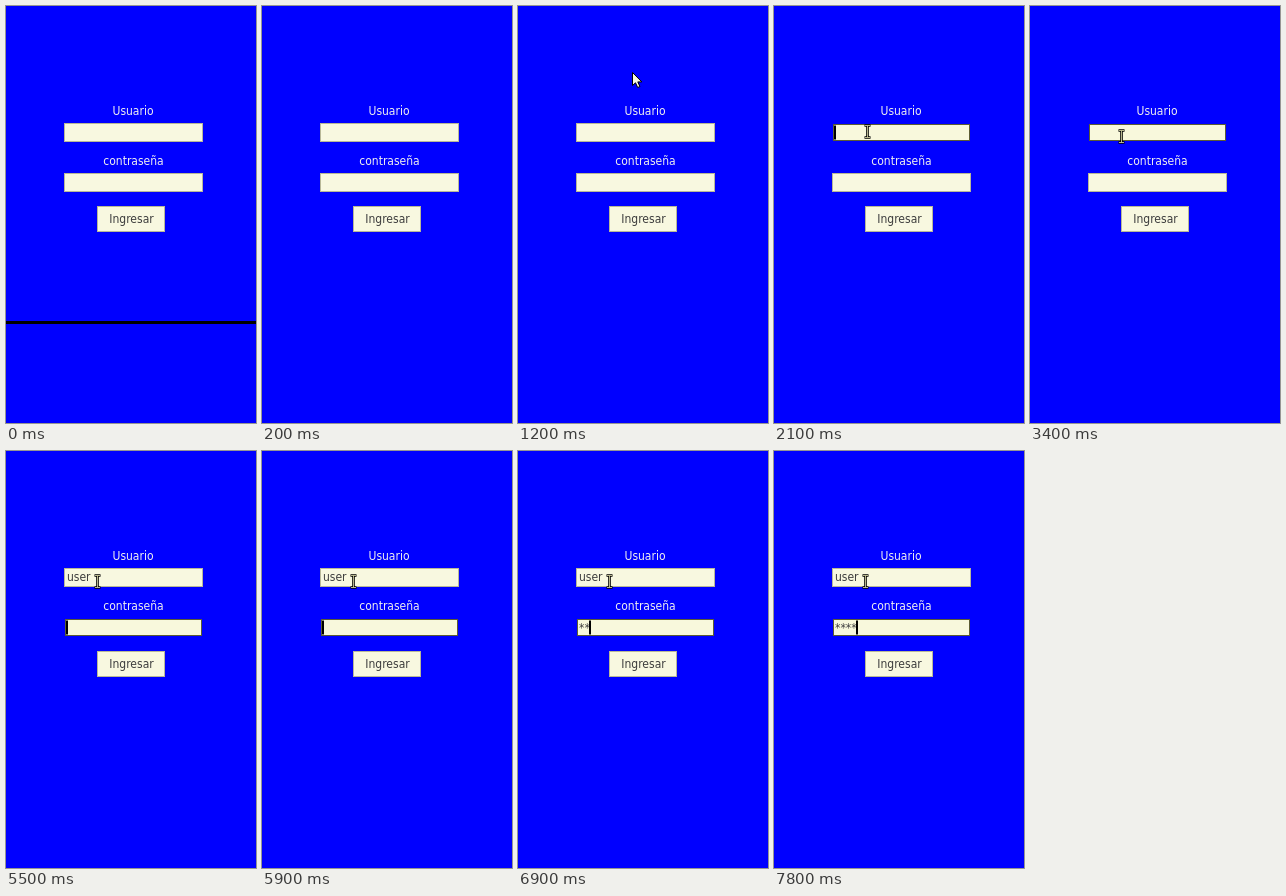
An HTML page for the animation above (8000 ms loop, 250 by 417 pixels).

```html
<!DOCTYPE html>
<html lang="es">
<head>
<meta charset="utf-8">
<title>Ingreso</title>
<style>
html, body { margin: 0; width: 100%; height: 100%; overflow: hidden; background: #00f; }
svg { display: block; width: 250px; height: 417px; }
text { font: 12px "DejaVu Sans Condensed", "Noto Sans", sans-serif; fill: #3c3c3c; }
.label { fill: #f0f0f0; }
.label, .caption { text-anchor: middle; }
.box { fill: #f8f8e0; stroke: #b8b898; }
.focus { fill: #f8f8dc; stroke: #5c5c34; }
</style>
</head>
<body>
<svg viewBox="0 0 250 417">
  <rect width="250" height="417" fill="#00f"/>
  <rect id="line" width="250" height="3"/>
  <text class="label" x="127" y="109">Usuario</text>
  <rect id="userBox" class="box"/>
  <text id="user" x="61" y="130"></text>
  <text class="label" x="127.5" y="159">contraseña</text>
  <rect id="passBox" class="box"/>
  <text id="pass" x="61" y="181"></text>
  <rect class="box" x="91.5" y="200.5" width="67" height="25"/>
  <text class="caption" x="125.5" y="217">Ingresar</text>
  <rect id="caret" width="2" height="14"/>
  <path id="arrow" d="M0 0V13L3 10.3L5.2 15L7.4 14L5.3 9.4H9.3Z" fill="#f8f8e0" stroke="#000"/>
  <g id="beam" fill="none">
    <path d="M-3 -6H3M0 -6V6M-3 6H3" stroke="#000" stroke-width="2.6"/>
    <path d="M-2.5 -6H2.5M0 -6V6M-2.5 6H2.5" stroke="#c8c89c" stroke-width=".9"/>
  </g>
</svg>
<script>
const LOOP = 8000;
const $ = id => document.getElementById(id);
const set = (id, attrs) => {
  for (const k in attrs) $(id).setAttribute(k, attrs[k]);
};
const show = (id, on) => set(id, { visibility: on ? "visible" : "hidden" });
const passed = (times, t) => times.filter(s => t >= s).length;

// time, x, y of the pointer
const pointer = [
  [1000, 122, 16], [1100, 119, 40], [1200, 114, 66], [1300, 104, 90],
  [1400, 92, 112], [1500, 84, 124], [1600, 93, 125], [2500, 92, 137], [2600, 91, 130]
];
const userKeys = [4600, 4900, 5000, 5200];
const passKeys = [6500, 6800, 7000, 7200];
// the caret switches at each of these, starting hidden
const blinks = [1900, 2500, 2800, 3400, 3700, 4200, 4500, 6200, 6500, 7500, 7800];

function field(id, y, focused) {
  const d = focused ? 1 : 0;
  set(id, {
    x: 58.5 + d, y: y + d, width: 138 - 2 * d, height: 18 - 2 * d,
    class: focused ? "focus" : "box"
  });
}

function draw(t) {
  show("line", t < 200);
  set("line", { y: t < 100 ? 315 : 370 });

  const inUser = t >= 1900 && t < 5400;
  const inPass = t >= 5400;
  field("userBox", 117.5, inUser);
  field("passBox", 167.5, inPass);

  $("user").textContent = "user".slice(0, passed(userKeys, t));
  $("pass").textContent = "*".repeat(passed(passKeys, t));

  const active = inPass ? $("pass") : $("user");
  const width = active.textContent ? active.getComputedTextLength() : 0;
  set("caret", { x: Math.round(60 + width), y: inPass ? 169.5 : 119.5 });
  show("caret", passed(blinks, t) % 2);

  const p = pointer.filter(k => t >= k[0]).pop();
  show("arrow", p && t < 1500);
  show("beam", p && t >= 1500);
  if (p) {
    const at = { transform: `translate(${p[1] + 0.5} ${p[2] + 0.5})` };
    set("arrow", at);
    set("beam", at);
  }
}

const start = performance.now();
function tick() {
  draw((performance.now() - start) % LOOP);
  requestAnimationFrame(tick);
}
tick();
</script>
</body>
</html>
```
